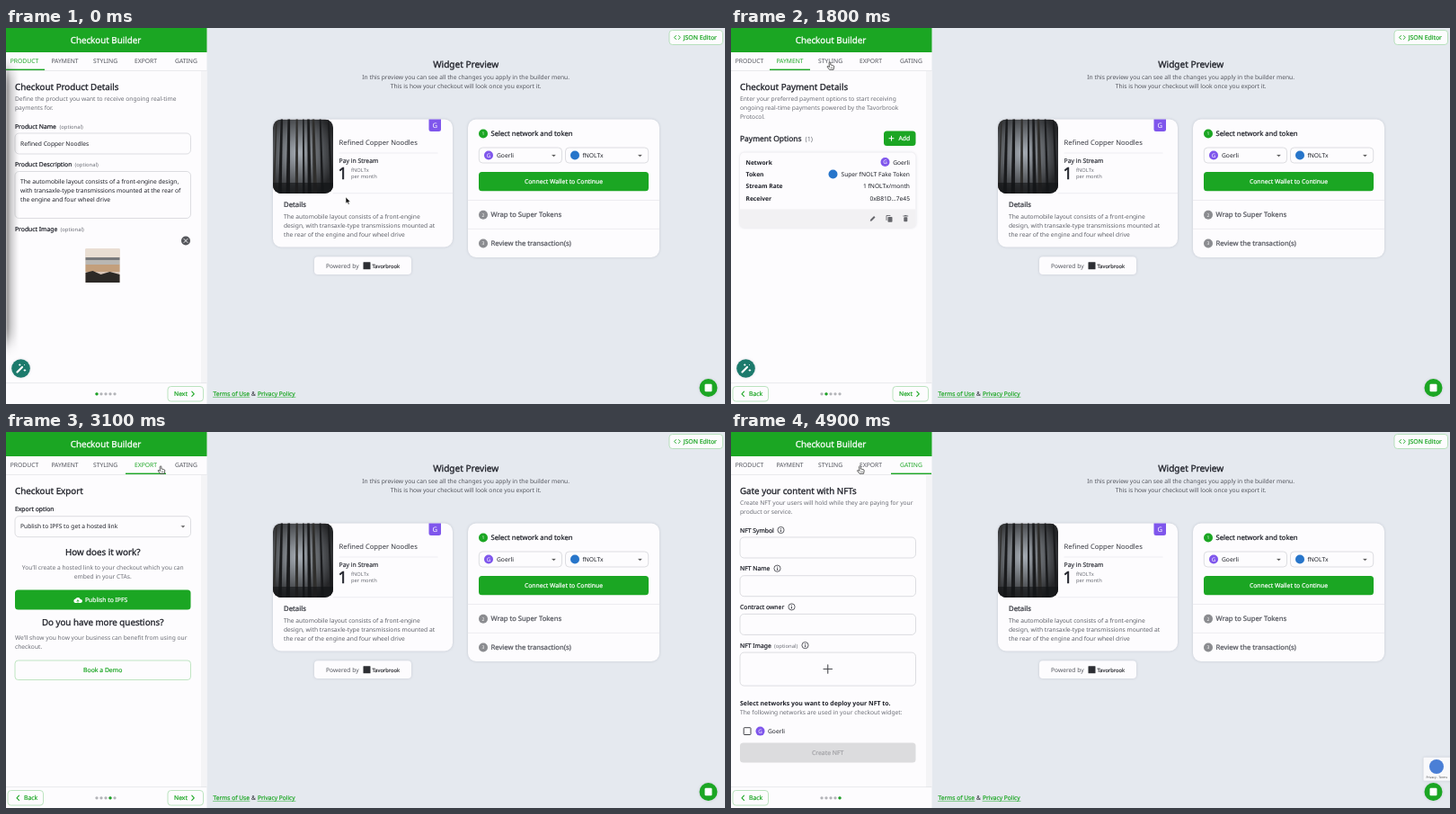
Animation of 800x418 px, one loop 5 s. Source, as an HTML page:

```html
<!DOCTYPE html>
<html lang="en">
<head>
<meta charset="utf-8">
<title>Checkout Builder</title>
<style>
html, body { margin: 0; height: 100%; overflow: hidden; background: #e5e9ef; }
svg { display: block; }
#stage { width: 100vw; height: 100vh; }
text { font-family: "Noto Sans", "Open Sans", sans-serif; text-rendering: geometricPrecision; white-space: pre; }
.shadow { filter: drop-shadow(0 .5px 1.5px rgba(30, 40, 60, .16)); }
</style>
</head>
<body>
<svg id="stage" viewBox="0 0 800 418" preserveAspectRatio="none"></svg>
<script>
const GREEN = '#1ba623', INK = '#1d1f27', GREY = '#6c6e76', LINE = '#cfd0d4', PAPER = '#fdfcfe';
const PURPLE = '#7f56ec', BLUE = '#2775ca', BODY = 6.68, HEAD = 9.78;
const PRODUCT = 'Refined Copper Noodles', BRAND = 'Tavorbrook', TOKEN = 'fNOLTx';
const TABS = ['PRODUCT', 'PAYMENT', 'STYLING', 'EXPORT', 'GATING'];

// medium weight is the regular face with a thin outline
const text = (x, y, s, fill = INK, size = BODY, weight = 400, anchor = 'start') =>
  `<text x="${x}" y="${y}" fill="${fill}" font-size="${size}" text-anchor="${anchor}" ` +
  (weight === 500 ? `stroke="${fill}" stroke-width="${size * .03}"` : `font-weight="${weight}"`) + `>${s}</text>`;
const mid = (x, y, s, fill, size, weight) => text(x, y, s, fill, size, weight, 'middle');
const lines = (x, y, rows, fill = GREY, anchor) =>
  rows.map((s, i) => text(x, y + i * 10, s, fill, BODY, 400, anchor)).join('');
const rect = (x, y, w, h, fill, r = 0, extra = '') =>
  `<rect x="${x}" y="${y}" width="${w}" height="${h}" rx="${r}" fill="${fill}" ${extra}/>`;
const box = (x, y, w, h, stroke = LINE, r = 4.5) =>
  rect(x, y, w, h, PAPER, r, `stroke="${stroke}" stroke-width=".7"`);
const dot = (x, y, r, fill, extra = '') => `<circle cx="${x}" cy="${y}" r="${r}" fill="${fill}" ${extra}/>`;
const path = (d, stroke, w = 1, fill = 'none') =>
  `<path d="${d}" fill="${fill}" stroke="${stroke}" stroke-width="${w}" stroke-linejoin="round" stroke-linecap="round"/>`;
const shape = (d, fill) => `<path d="${d}" fill="${fill}"/>`;
const group = (id, body) => `<g id="${id}">${body}</g>`;
const raised = body => `<g class="shadow">${body}</g>`;

const avatar = (x, y) => dot(x, y, 5, PURPLE) + mid(x, y + 2.2, 'G', '#fff', 6.2);
const arrow = (x, y) => path(`M${x - 2} ${y - 1}h4l-2 2z`, '#555', .2, '#555');
const title = s => text(10, 69.4, s, INK, HEAD, 500);
const label = (x, y, s) => text(x, y, s, INK, 6.8, 500);
const optional = (x, y) => text(x, y, '(optional)', GREY, 5.85);
const info = (x, y) => dot(x, y, 3.6, 'none', `stroke="${INK}" stroke-width=".7"`) +
  path(`M${x} ${y}v1.7M${x} ${y - 1.7}v.1`, INK, .8);
const select = (y, s) => box(10, y, 195.5, 23) + text(16, y + 13, s) + arrow(197, y + 11.5);

function forest() {
  let s = rect(297, 101.5, 67, 82.5, 'url(#woods)');
  for (let i = 0; i < 9; i++) {
    const x = 297 + i * 7.8 + 2 * Math.sin(i * 5), w = 2 + 2.4 * Math.abs(Math.sin(i * 2.3));
    s += shape(`M${x} 184L${x + (331 - x) * .1} 101h${w * .6}L${x + w} 184z`, i % 3 ? '#1a1b1d' : '#2f2e2c');
  }
  return `<g clip-path="url(#photo)">${s}${rect(297, 172, 67, 12, '#121315', 0, 'opacity=".6"')}</g>`;
}

const beach = rect(88.5, 245.5, 38, 37.5, '#d9c6b8') + rect(88.5, 245.5, 38, 10, '#e9ded2') +
  rect(88.5, 255, 38, 3, '#77787a') + rect(88.5, 258, 38, 5, '#b9b7b3') + rect(88.5, 263, 38, 8, '#c39f7c') +
  shape('M88.5 283v-11l8-2 9 4 10-3 11 3v9z', '#2c2926');

const panels = [
  title('Checkout Product Details') +
  lines(10, 81.4, ['Define the product you want to receive ongoing real-time', 'payments for.']) +
  label(10, 111.5, 'Product Name') + optional(59.5, 111.5) +
  box(10, 117, 195.5, 23) + text(16, 130.7, PRODUCT) +
  label(10, 154.2, 'Product Description') + optional(76.5, 154.2) + box(10, 159.5, 195.5, 52) +
  lines(16, 172.7, ['The automobile layout consists of a front-engine design,',
    'with transaxle-type transmissions mounted at the rear of', 'the engine and four wheel drive'], INK) +
  label(10, 225.6, 'Product Image') + optional(60.5, 225.6) +
  dot(200, 236.5, 5, '#55565b') + path('M198 234.5l4 4m0-4l-4 4', '#fff', .9) + beach,

  title('Checkout Payment Details') +
  lines(10, 81.4, ['Enter your preferred payment options to start receiving',
    `ongoing real-time payments powered by the ${BRAND}`, 'Protocol.']) +
  text(10, 125.5, 'Payment Options', INK, 8.45, 500) + text(82.5, 125.5, '(1)', GREY, 7.2) +
  rect(170, 114.5, 35.5, 16.5, GREEN, 3.5) + path('M176 122.7h5m-2.5-2.5v5', '#fff') + text(186.5, 125.2, 'Add', '#fff', 6.8, 500) +
  raised(rect(10, 138.5, 195.5, 83.5, PAPER, 5)) +
  shape('M10 201.5h195.5v16q0 4.5-4.5 4.5h-186.5q-4.5 0-4.5-4.5z', '#f2f1f3') +
  ['Network', 'Token', 'Stream Rate', 'Receiver'].map((s, i) => text(16.5, 151.5 + i * 13.4, s, INK, BODY, 600)).join('') +
  ['Goerli', 'Super fNOLT Fake Token', `1 ${TOKEN}/month`, '0xB81D...7e45'].map((s, i) =>
    text(199, 151.5 + i * 13.4, s, INK, BODY, 400, 'end')).join('') +
  avatar(171.5, 149) + dot(113.5, 162.5, 5, BLUE) +
  shape('M154.8 214.7l.3-1.7 4-4 1.4 1.4-4 4z', '#66676c') +
  path('M173 213.5v-5h4', '#66676c', .9) + rect(174.5, 210, 5, 5.7, '#66676c', .7) +
  path('M191.8 209h5m-3.4-.5h1.8', '#66676c', .9) + rect(192.3, 210.2, 4, 5, '#66676c', .7),

  title('Checkout Styling') +
  label(10, 88, 'Layout') + select(93.7, 'Page') +
  label(10, 131, 'Font Family') + select(136.7, 'Noto Sans'),

  title('Checkout Export') + label(10, 88, 'Export option') + select(93.7, 'Publish to IPFS to get a hosted link') +
  mid(107.7, 137.4, 'How does it work?', INK, HEAD, 500) +
  lines(107.7, 152.5, ['You’ll create a hosted link to your checkout which you can', 'embed in your CTAs.'], GREY, 'middle') +
  rect(10, 175.5, 195.5, 22, GREEN, 3.5) +
  shape('M77 190a2.3 2.3 0 0 1 .3-4.5a3 3 0 0 1 5.5.5a2 2 0 0 1 .3 4z', '#fff') +
  path('M80 189.3v-2.3m-1.2 1l1.2-1.2 1.2 1.2', GREEN, .8) +
  text(88, 189, 'Publish to IPFS', '#fff', 6.8, 500) +
  mid(107.7, 215.4, 'Do you have more questions?', INK, HEAD, 500) +
  lines(10, 230.8, ['We’ll show you how your business can benefit from using our', 'checkout.']) +
  box(10, 254, 195.5, 21.5, '#a5dcaa', 3.5) + mid(107.7, 267.2, 'Book a Demo', GREEN, 6.85, 500),

  title('Gate your content with NFTs') +
  lines(10, 81.4, ['Create NFT your users will hold while they are paying for your', 'product or service.']) +
  ['NFT Symbol', 'NFT Name', 'Contract owner', 'NFT Image'].map((s, i) =>
    label(10, 111.5 + i * 42.7, s) + info([55.5, 51.5, 67.5, 82.5][i], 109 + i * 42.7) +
    box(10, 117 + i * 42.7, 195.5, i < 3 ? 23 : 37)).join('') +
  optional(48, 239.6) + path('M103 263.5h9.5m-4.75-4.75v9.5', '#4a4b50', 1.1) +
  text(10, 303.6, 'Select networks you want to deploy your NFT to.', INK, 6.95, 600) +
  text(10, 313.6, 'The following networks are used in your checkout widget:', GREY) +
  rect(14.2, 328.7, 7.8, 7.8, PAPER, .8, 'stroke="#45464b"') + avatar(32.5, 332.6) + text(41, 335, 'Goerli') +
  rect(10, 345.5, 195.5, 22, '#dcdcde', 3.5) + mid(107.7, 359, 'Create NFT', '#a3a3a7', 6.85, 500)
];

const wand = dot(16.5, 378.5, 10.3, '#1c7a6c', 'class="shadow"') + path('M12.5 382.5l5.5-5.5', '#fff', 2.2) +
  path('M20.5 374.5v-.1M14.5 374.5h1.6m-.8-.8v1.6M20 380.5h1.8m-.9-.9v1.8', '#fff', .9);

const sidebar = rect(0, 0, 223.5, 418, PAPER) + rect(217, 48, 6.5, 347, '#f4f4f6') +
  rect(0, 0, 223.5, 27, GREEN) + mid(111, 16.9, 'Checkout Builder', '#fff', 9.78, 500) +
  rect(0, 47, 223.5, .6, '#dedfe3') +
  '<svg id="ripple" y="27" width="45" height="20"><circle cy="10" fill="#1ba623"/></svg>' +
  TABS.map((s, i) => `<g class="tab">${mid(20.5 + i * 45, 39.3, s, '', 6.75)}</g>`).join('') +
  `<rect id="bar" y="45.6" width="45" height="1.4" fill="${GREEN}"/>` +
  panels.map(p => `<g class="panel">${p}</g>`).join('') + group('wand', wand) +
  rect(0, 394.5, 223.5, .6, '#dcdde1') +
  TABS.map((_, i) => dot(101 + i * 5, 406.8, 1.65, '#b3b4b8') + dot(101 + i * 5, 406.8, 1.65, GREEN, 'class="on"')).join('') +
  group('back', box(2, 398.5, 39.5, 16.5, '#a0d9a5', 3.5) + path('M14.5 404.2l-2.5 2.6 2.5 2.6', GREEN, 1.1) + text(20, 409.2, 'Back', GREEN, 6.8, 500)) +
  group('next', box(180, 398.5, 39.5, 16.5, '#a0d9a5', 3.5) + path('M206.8 404.2l2.5 2.6-2.5 2.6', GREEN, 1.1) + text(187, 409.2, 'Next', GREEN, 6.8, 500));

const step = (n, y, s, on) => dot(531, y, 5, on ? GREEN : '#8b8c90') + mid(531, y + 1.8, n, '#fff', 5) +
  text(539.5, y + 2.6, s, on ? INK : '#54565e', 7.65, 500);

const preview = mid(511.7, 43.6, 'Widget Preview', INK, 10.1, 500) +
  lines(511.7, 57.2, ['In this preview you can see all the changes you apply in the builder menu.',
    'This is how your checkout will look once you export it.'], '#54565e', 'middle') +
  box(738, 2.5, 59.5, 16, '#a0d9a5', 3.5) + path('M745.5 8.5l-2 2 2 2m2.8-4l2 2-2 2', GREEN, .9) +
  text(753.7, 12.9, 'JSON Editor', GREEN, 6.85, 500) +
  raised(rect(297, 101.5, 200, 142, PAPER, 9)) + forest() +
  path('M364 183.7h133M371 139h109', '#e3e2e7', .6) +
  shape('M470.5 101.5h13.5v11q0 2.5-2.5 2.5h-8.5q-2.5 0-2.5-2.5z', PURPLE) + mid(477.2, 111, 'G', '#fff', 7.6) +
  text(370.6, 130.2, PRODUCT, '#33353d', 7.63) + text(370.6, 150.2, 'Pay in Stream', '#33353d', 6.8, 500) +
  text(369.5, 168, '1', INK, 18, 500) + text(384, 160.2, TOKEN, GREY, 5.75) + text(384, 167.3, 'per month', GREY, 5.75) +
  text(309, 198.6, 'Details', '#33353d', 7.75, 500) +
  lines(309, 212.3, ['The automobile layout consists of a front-engine',
    'design, with transaxle-type transmissions mounted at', 'the rear of the engine and four wheel drive'], '#5f6169') +
  raised(rect(343, 254.3, 108, 19.7, PAPER, 4)) + text(356, 266.7, 'Powered by', '#54565e') +
  rect(397.5, 260.3, 8, 8, '#2d2e33', .5) + text(407.5, 266.5, BRAND, '#2d2e33', 5.75, 500) +
  raised(rect(514, 101.5, 213, 153.5, PAPER, 9)) +
  path('M514 191.5h213M514 223.4h213', '#e3e2e7', .6) +
  step(1, 117.5, 'Select network and token', true) + step(2, 207.8, 'Wrap to Super Tokens') + step(3, 239.5, 'Review the transaction(s)') +
  box(526.3, 133, 92.2, 17, LINE, 4) + box(622.5, 133, 92.2, 17, LINE, 4) + arrow(609.5, 142) + arrow(705.5, 142) +
  avatar(537, 141.5) + text(546, 143.9, 'Goerli') + dot(633, 141.5, 5, BLUE) + text(641.5, 143.9, TOKEN) +
  rect(526, 160, 189, 21.3, GREEN, 3.5) + mid(620.5, 173, 'Connect Wallet to Continue', '#fff', 6.8, 500) +
  text(230.5, 409, 'Terms of Use', GREEN, 6.6, 500) + text(273, 409, '&amp;', INK, 6.6) + text(280, 409, 'Privacy Policy', GREEN, 6.6, 500) +
  path('M230.5 410.4h40.5M280 410.4h42', GREEN, .5) +
  group('badge', raised(rect(770.5, 361.7, 32, 26, '#f9f9fb', 1)) + dot(785, 372, 8, '#4a7fd6') +
    mid(785.3, 385.2, 'Privacy - Terms', '#444', 3.35)) +
  dot(781.5, 400, 10, GREEN, 'class="shadow"') + rect(777.5, 395.7, 8, 8.5, '#fff', 1.2);

const stage = document.getElementById('stage');
stage.innerHTML = `<defs>
  <radialGradient id="woods" cx=".42" cy=".45" r=".62">
    <stop offset="0" stop-color="#a9b0b8"/><stop offset=".45" stop-color="#6d7176"/><stop offset="1" stop-color="#242527"/></radialGradient>
  <linearGradient id="fade"><stop stop-opacity=".5"/><stop offset=".4" stop-opacity=".18"/><stop offset="1" stop-opacity="0"/></linearGradient>
  <clipPath id="photo"><rect x="297" y="101.5" width="67" height="82.5" rx="9"/></clipPath>
  <filter id="soft" x="-1" y="-.2" width="3" height="1.4"><feGaussianBlur stdDeviation="1 9"/></filter></defs>` +
  rect(0, 0, 800, 418, '#e5e9ef') + preview + sidebar +
  group('shade', rect(0, 48, 14, 300, 'url(#fade)', 0, 'filter="url(#soft)"')) +
  group('status', rect(0, 409.7, 265, 9, '#000') + text(.8, 415.6, 'Waiting for api-iam.intercom.io...', '#fff', 4.95, 500)) +
  group('arrow', path('M0 0v7.2l1.7-1.5 1.2 2.5 1.3-.6-1.2-2.4h2.2z', '#fff', .6, '#111')) +
  group('hand', path('M-.8.8q.8-1.2 1.6 0v2.7l2.8.6q1.2.3 1.1 1.4l-.6 3.3h-4.6l-2.6-3.4q.6-1.2 2.3.2z', '#222', .7, '#fff') +
    path('M1.2 6v1.5m1.5-1.5v1.5', '#222', .4));

const $ = id => document.getElementById(id);
const all = c => [...stage.querySelectorAll(c)];
const tabs = all('.tab text'), views = all('.panel'), lights = all('.on'), wave = $('ripple').firstChild;
const show = (el, on) => el.setAttribute('display', on ? 'inline' : 'none');
const clamp = v => Math.min(1, Math.max(0, v));
const smooth = v => (v = clamp(v), v * v * (3 - 2 * v));

const LOOP = 5000, STEP = 100;
const CLICKS = [-1000, 1050, 1900, 2550, 3700];
const MOVES = [[0, 378, 188], [200, 378, 188], [800, 72, 37.5], [1250, 72, 37.5], [1700, 110, 37.5],
  [2050, 110, 37.5], [2450, 162.5, 37.5], [2900, 162.5, 37.5], [3500, 199.5, 37.5], [4400, 199.5, 37.5], [4900, 143.5, 37.5]];

function pointer(t) {
  const i = MOVES.findIndex(m => m[0] > t);
  if (i < 0) return MOVES[MOVES.length - 1].slice(1);
  const [t0, x0, y0] = MOVES[i - 1], [t1, x1, y1] = MOVES[i], k = smooth((t - t0) / (t1 - t0));
  return [x0 + (x1 - x0) * k, y0 + (y1 - y0) * k];
}

function draw(t) {
  const at = CLICKS.filter(c => c <= t).length - 1, since = t - CLICKS[at];
  tabs.forEach((el, i) => el.setAttribute('fill', i === at ? GREEN : '#4f5159'));
  views.forEach((el, i) => show(el, i === at));

  const mix = clamp(since / 100);
  lights.forEach((el, i) => el.setAttribute('opacity', i === at ? mix : i === at - 1 ? 1 - mix : 0));
  $('bar').setAttribute('x', 45 * (at - 1 + smooth((since - 50) / 300)) - 2);

  // the press starts shortly before the tab switches
  const press = CLICKS.filter(c => c - 100 <= t).length - 1, age = t - CLICKS[press] + 100;
  const left = 45 * press - 2;
  $('ripple').setAttribute('x', left);
  wave.setAttribute('cx', pointer(Math.max(0, CLICKS[press]))[0] - left);
  wave.setAttribute('r', 30 * clamp(age / 500));
  wave.setAttribute('opacity', .25 * (1 - clamp((age - 200) / 400)));

  show($('wand'), at < 3);
  show($('back'), at > 0);
  show($('next'), at < 4);
  show($('status'), t >= 3500 && t < 4400);
  show($('badge'), t >= 3900);
  $('shade').setAttribute('opacity', 1 - clamp(t / 300));

  const [x, y] = pointer(t), onTab = y < 47;
  show($('arrow'), !onTab);
  show($('hand'), onTab);
  $(onTab ? 'hand' : 'arrow').setAttribute('transform', `translate(${x} ${y})`);
}

const start = performance.now();
function tick() {
  const t = Math.max(0, performance.now() - start) % LOOP;
  draw(Math.floor(t / STEP) * STEP);
  requestAnimationFrame(tick);
}
tick();
</script>
</body>
</html>
```
